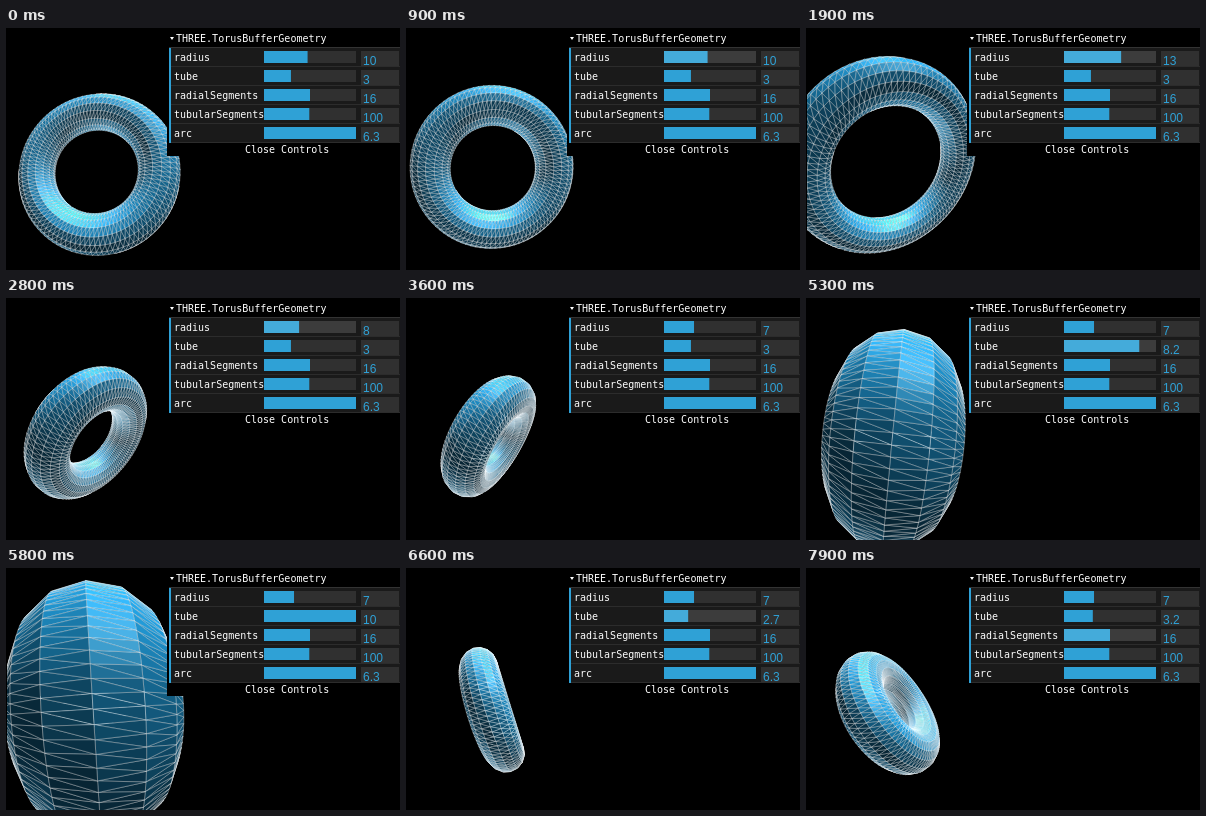
An HTML page with a canvas for the animation above (8 s loop, 394x242 px).

```html
<!DOCTYPE html>
<html lang="en">
<head>
<meta charset="utf-8">
<title>Torus geometry</title>
<style>
  html, body { margin: 0; width: 100%; height: 100%; overflow: hidden; background: #000; }
  canvas, svg { position: absolute; left: 0; top: 0; width: 394px; height: 242px; }
  text { font: 10px "DejaVu Sans Mono", "Liberation Mono", monospace; fill: #fff; }
  .value { font: 12px "Liberation Sans", Arial, sans-serif; fill: #2fa1d6; }
</style>
</head>
<body>
<canvas id="scene" width="394" height="242"></canvas>
<svg id="panel" viewBox="0 0 394 242"></svg>
<script>
const LOOP = 8000, STEP = 100;
const CENTER = [88, 141.3], FOCAL = 184.5, CAMERA_Z = 30;
const TAU = Math.PI * 2;
const ctx = document.getElementById('scene').getContext('2d');
const panel = document.getElementById('panel');

// Slider positions over time: [ms, value]
const radiusKeys = [[1300, 10], [1900, 12.8], [2200, 16], [2700, 8.4], [2800, 8.25], [3200, 7.2]];
const tubeKeys = [[3800, 3], [4500, 0.75], [4600, 0.66], [4800, 1.2], [5400, 9.6], [5500, 10],
  [5900, 10], [6300, 4.5], [6600, 2.7], [7100, 2.7], [7500, 3.2]];
// Which row the pointer is over, from the given time on
const hoverKeys = [[0, -1], [500, 0], [3300, -1], [3700, 1], [5500, -1], [6000, 1], [7500, 2]];

const rows = [
  { name: 'radius', min: 1, max: 20, digits: 0 },
  { name: 'tube', min: 0.1, max: 10, digits: 1 },
  { name: 'radialSegments', min: 2, max: 30, digits: 0 },
  { name: 'tubularSegments', min: 3, max: 200, digits: 0 },
  { name: 'arc', min: 0.1, max: TAU, digits: 1 }
];

function valueAt(keys, t) {
  if (t <= keys[0][0]) return keys[0][1];
  for (let i = 1; i < keys.length; i++) {
    const [t0, v0] = keys[i - 1], [t1, v1] = keys[i];
    if (t <= t1) return v0 + (v1 - v0) * (t - t0) / (t1 - t0);
  }
  return keys[keys.length - 1][1];
}

// Vector helpers
const sub = (a, b) => [a[0] - b[0], a[1] - b[1], a[2] - b[2]];
const dot = (a, b) => a[0] * b[0] + a[1] * b[1] + a[2] * b[2];
const cross = (a, b) => [a[1] * b[2] - a[2] * b[1], a[2] * b[0] - a[0] * b[2], a[0] * b[1] - a[1] * b[0]];
const unit = a => { const l = Math.hypot(...a) || 1; return a.map(v => v / l); };

const lights = [[0, 200, 0], [100, 200, 100], [-100, -200, -100]];
const diffuse = [21, 98, 137], emissive = [7, 37, 52];

function shade(normal, point) {
  const view = unit(sub([0, 0, CAMERA_Z], point));
  let lambert = 0, gloss = 0;
  for (const light of lights) {
    const dir = unit(sub(light, point));
    const amount = dot(normal, dir);
    if (amount <= 0) continue;
    const half = unit([dir[0] + view[0], dir[1] + view[1], dir[2] + view[2]]);
    lambert += amount;
    gloss += 68 * amount * Math.max(0, dot(normal, half)) ** 30;
  }
  const rgb = diffuse.map((c, i) => Math.min(255, Math.round(c * lambert + emissive[i] + gloss)));
  return `rgb(${rgb})`;
}

function torusPoints(radius, tube, radial, tubular, angle) {
  const s = Math.sin(angle), c = Math.cos(angle), grid = [];
  for (let j = 0; j <= radial; j++) {
    const v = j / radial * TAU, ring = radius + tube * Math.cos(v), z = tube * Math.sin(v);
    grid.push(Array.from({ length: tubular + 1 }, (_, i) => {
      const u = i / tubular * TAU, x = ring * Math.cos(u), y = ring * Math.sin(u);
      const depth = z * c - x * s;
      const p = [x * c + z * s, y * c - depth * s, y * s + depth * c];
      const k = FOCAL / (CAMERA_Z - p[2]);
      p.screen = [CENTER[0] + p[0] * k, CENTER[1] - p[1] * k];
      return p;
    }));
  }
  return grid;
}

function drawTorus(radius, tube, radial, tubular, angle) {
  const grid = torusPoints(radius, tube, radial, tubular, angle), faces = [];
  const addFace = (...corners) => {
    const [a, b, d] = corners;
    const normal = unit(cross(sub(b, a), sub(d, a)));
    const mid = [0, 1, 2].map(i => (a[i] + b[i] + d[i]) / 3);
    const toCamera = sub([0, 0, CAMERA_Z], mid);
    if (dot(normal, toCamera) > 0) faces.push({ corners, normal, mid, far: Math.hypot(...toCamera) });
  };
  for (let j = 1; j <= radial; j++) {
    for (let i = 1; i <= tubular; i++) {
      const a = grid[j][i - 1], b = grid[j - 1][i - 1], c = grid[j - 1][i], d = grid[j][i];
      addFace(a, b, d);
      addFace(b, c, d);
    }
  }
  faces.sort((p, q) => q.far - p.far);

  ctx.fillStyle = '#000';
  ctx.fillRect(0, 0, 394, 242);
  ctx.lineWidth = 1;
  ctx.lineJoin = 'round';
  ctx.strokeStyle = 'rgba(255,255,255,.31)';
  for (const { corners, normal, mid } of faces) {
    ctx.beginPath();
    corners.forEach(p => ctx.lineTo(...p.screen));
    ctx.closePath();
    ctx.fillStyle = shade(normal, mid);
    ctx.fill();
    ctx.stroke();
  }
  ctx.fillStyle = '#000';
  ctx.fillRect(0, 0, 1, 242);
}

function add(tag, attrs, text = '') {
  const el = document.createElementNS('http://www.w3.org/2000/svg', tag);
  for (const key in attrs) el.setAttribute(key, attrs[key]);
  el.textContent = text;
  return panel.appendChild(el);
}
const box = (x, y, width, height, fill) => add('rect', { x, y, width, height, fill });

function buildPanel() {
  box(161, 0, 233, 128, '#000');
  add('path', { d: 'M164 9h4l-2 3z', fill: '#fff' });
  add('text', { x: 170, y: 14 }, 'THREE.TorusBufferGeometry');
  box(163, 19, 231, 1, '#333');
  rows.forEach((row, i) => {
    const y = 20 + i * 19;
    box(163, y, 231, 18, '#1a1a1a');
    box(163, y + 18, 231, 1, '#2c2c2c');
    box(163, y, 2, 19, '#2fa1d6');
    add('text', { x: 168, y: y + 13 }, row.name);
    row.track = box(258, y + 3, 92, 12, '#303030');
    row.bar = box(258, y + 3, 0, 12, '#2fa1d6');
    box(355, y + 3, 38, 15, '#303030');
    row.label = add('text', { x: 357, y: y + 17, class: 'value' });
  });
  add('text', { x: 239, y: 125 }, 'Close Controls');
}

function draw(t) {
  const radius = valueAt(radiusKeys, t), tube = valueAt(tubeKeys, t);
  const values = [radius, tube, 16, 100, TAU];
  const hover = hoverKeys.filter(key => key[0] <= t).pop()[1];
  drawTorus(radius, tube, 16, 100, -0.2 + 0.316 * t / 1000);
  rows.forEach((row, i) => {
    const part = (values[i] - row.min) / (row.max - row.min);
    row.bar.setAttribute('width', 92 * part);
    row.bar.setAttribute('fill', i === hover ? '#44abda' : '#2fa1d6');
    row.track.setAttribute('fill', i === hover ? '#3c3c3c' : '#303030');
    row.label.textContent = +values[i].toFixed(row.digits);
  });
}

let start, shown = -1;
function tick(now) {
  start ??= now;
  const t = Math.floor((now - start) % LOOP / STEP) * STEP;
  if (t !== shown) draw(shown = t);
  requestAnimationFrame(tick);
}

buildPanel();
draw(0);
requestAnimationFrame(tick);
</script>
</body>
</html>
```
